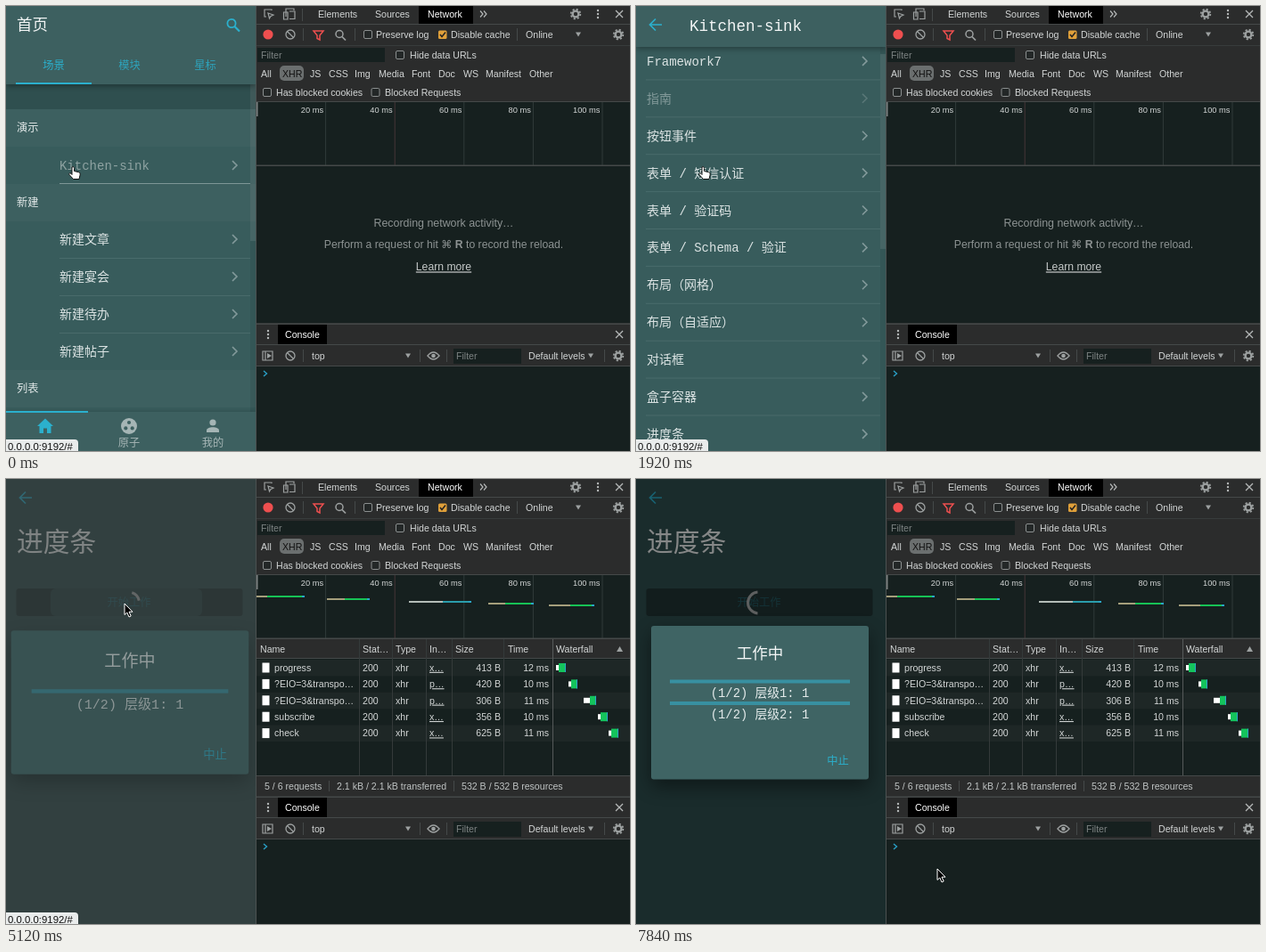
Write an HTML page that moves like this. It is 700 by 500 pixels and loops after 8 s.

```html
<!DOCTYPE html>
<html lang="zh">
<head>
<meta charset="utf-8">
<title>Progress dialog demo</title>
<style>
html, body { margin: 0; width: 100%; height: 100%; overflow: hidden; background: #2f4f4f; }
svg { display: block; width: 100%; height: 100%; }
text { white-space: pre; }
.app text { font-family: "Liberation Mono", "Noto Sans CJK SC", "Noto Sans CJK JP", monospace; }
.dev text, .tip text { font-family: "Liberation Sans", Arial, sans-serif; }
#dialog rect.box { filter: drop-shadow(0 8px 10px rgba(0,0,0,.45)); }
.bar { filter: drop-shadow(0 2px 3px rgba(0,0,0,.35)); }
</style>
</head>
<body>
<svg id="stage" viewBox="0 0 700 500"></svg>
<script>
const CYAN = '#2bb0cd', PAGE = '#2f4f4f', LIST = '#385c5c', BAR = '#3d6060';
const PANEL = '#2b2c2c', DARK = '#16201f', LINE = '#454949', GREY = '#9da1a1';
const LOOP = 8000, STEP = 160;

// y is the vertical middle of the text
const text = (x, y, s, size, fill, anchor = 'start', extra = '') =>
  `<text x="${x}" y="${y + size * .36}" font-size="${size}" fill="${fill}" text-anchor="${anchor}" ${extra}>${s}</text>`;
const rect = (x, y, w, h, fill, extra = '') =>
  `<rect x="${x}" y="${y}" width="${w}" height="${h}" fill="${fill}" ${extra}/>`;
const path = (d, stroke, width = 1.2, extra = '') =>
  `<path d="${d}" fill="none" stroke="${stroke}" stroke-width="${width}" ${extra}/>`;
const disc = (x, y, r, fill) => `<circle cx="${x}" cy="${y}" r="${r}" fill="${fill}"/>`;
const ring = (x, y, r, stroke, w = 1.3, extra = '') =>
  `<circle cx="${x}" cy="${y}" r="${r}" fill="none" stroke="${stroke}" stroke-width="${w}" ${extra}/>`;
const group = (id, body, extra = '') => `<g id="${id}" ${extra}>${body}</g>`;

// ---- phone side ----
const chevron = y => path(`M254 ${y - 5}l5 5l-5 5`, '#82999a', 1.6);
const divider = (x, y) => rect(x, y, 274 - x, 1, '#496b6b');
const back = path('M29 21H16M22 14.5L15.5 21L22 27.5', CYAN, 1.7);
const scrollbar = (id, h) => rect(274, 0, 6, 500, '#000', 'opacity=".07"') +
  rect(274, 0, 6, h, '#fff', `id="${id}" opacity=".09"`);

function home() {
  let s = rect(0, 0, 280, 500, PAGE) + rect(0, 116, 280, 340, LIST);
  [['演示', 137], ['新建', 221], ['列表', 430]].forEach(([name, y]) => {
    s += rect(0, y - 21, 280, 42, BAR) + text(12, y, name, 12.25, '#e3e9e9');
  });
  s += text(60, 179, 'Kitchen-sink', 14, '#8fa3a2') + chevron(179) + rect(60, 199, 214, 1, '#7e9696');
  ['文章', '宴会', '待办', '帖子'].forEach((name, i) => {
    const y = 262 + 42 * i;
    s += text(60, y, '新建' + name, 14, '#dce4e4') + chevron(y);
    if (i < 3) s += divider(60, y + 21);
  });
  s += scrollbar('homeThumb', 264);
  s += `<g class="bar">${rect(0, 0, 280, 88, BAR)}</g>` + text(12, 21, '首页', 17.5, '#f2f5f5');
  s += ring(253, 19.5, 4.6, CYAN, 1.8) + path('M256.5 23L262 28.5', CYAN, 2.2);
  ['场景', '模块', '星标'].forEach((name, i) =>
    s += text(53.5 + 85 * i, 67, name, 12.25, CYAN, 'middle', i ? 'opacity=".85"' : ''));
  s += rect(11, 86, 85, 2, CYAN);
  s += `<g class="bar">${rect(0, 456, 280, 44, BAR)}</g>` + rect(0, 455, 92, 2, CYAN);
  s += `<path d="M44 463.5L53 472H50.5V480H46V474.5H42V480H37.500V472H35Z" fill="${CYAN}"/>`;
  s += disc(138, 472, 9, '#a5b5b5') + disc(138, 468, 2.1, BAR) + disc(134.3, 474.4, 2.1, BAR) + disc(141.7, 474.4, 2.1, BAR);
  s += disc(232, 468, 3.6, '#a5b5b5') + '<path d="M225 479v-2c0-5 14-5 14 0v2z" fill="#a5b5b5"/>';
  return s + text(138, 491, '原子', 12.25, '#a5b5b5', 'middle') + text(232, 491, '我的', 12.25, '#a5b5b5', 'middle');
}

const ITEMS = ['关于', 'Framework7', '指南', '按钮事件', '表单 / 短信认证', '表单 / 验证码',
  '表单 / Schema / 验证', '布局（网格）', '布局（自适应）', '对话框', '盒子容器', '进度条',
  '滑块', '标签页', '图标'];

function kitchen() {
  const rows = ITEMS.map((name, i) => {
    const y = 144 + 41.9 * i;
    return `<g class="row">${text(12, y, name, 14, '#dce4e4')}${chevron(y)}</g>` + divider(11, y + 20.5);
  }).join('');
  return rect(0, 0, 280, 500, PAGE) + group('list', rect(0, 123, 280, 700, LIST) + rows) +
    scrollbar('thumb', 219) + rect(0, 0, 280, 123, PAGE, 'id="head"') +
    group('compact', `<g class="bar">${rect(0, 0, 280, 46, BAR)}</g>` + text(60, 22, 'Kitchen-sink', 17.5, '#f2f5f5')) +
    group('large', text(12, 71, 'Kitchen-sink', 29.75, '#f2f5f5')) + back;
}

function progress() {
  return rect(0, 0, 280, 500, PAGE) + back + text(12, 70, '进度条', 29.75, '#f2f5f5') +
    rect(11.5, 123, 254, 31, '#000', 'id="button" rx="3" opacity="0"') +
    rect(50, 123, 170, 31, '#4f8080', 'id="ripple" rx="6" opacity="0"') +
    text(138, 139, '开始工作', 12.25, CYAN, 'middle', 'id="start"') + path('', '#a8acac', 3, 'id="spin"');
}

const level = n => {
  const y = 62.5 + 24.5 * (n - 1);
  return rect(38, y - 2, 202, 4, '#3890a1') + text(139, y + 12.5, `(1/2) 层级${n}: 1`, 13.8, '#e3eaea', 'middle');
};
const dialog = () => rect(17, 0, 244, 148, '#3f6464', 'class="box" id="box" rx="3"') +
  text(139, 31, '工作中', 17.5, '#f4f7f7', 'middle') + level(1) + group('level2', level(2)) +
  group('stop', text(226.500, 127, '中止', 12.25, CYAN, 'middle'));

// ---- inspector side ----
const gear = (x, y) => ring(x, y, 3.4, GREY, 2.4) + ring(x, y, 5.3, GREY, 1.8, 'stroke-dasharray="2.1 2.06"');
const cross = (x, y) => path(`M${x - 4} ${y - 4}l8 8m0-8l-8 8`, '#b5b8b8', 1.3);
const dots = (x, y) => [-4, 0, 4].map(d => disc(x, y + d, 1.2, '#b5b8b8')).join('');
const block = (x, y) => ring(x, y, 5, GREY) + path(`M${x - 3.500} ${y - 3.5}l7 7`, GREY);
const caret = (x, y) => `<path d="M${x - 3} ${y - 2.500}h6l-3 5z" fill="${GREY}"/>`;
const check = (x, y) => rect(x - 4.5, y - 4.5, 9, 9, '#232727', 'rx="1.5" stroke="#8b8f8f"');
const label = (x, y, s, fill = '#d3d6d6', anchor = 'start') => text(x, y, s, 10.6, fill, anchor);
const vline = (x, y, h, c = LINE) => rect(x, y, 1, h, c);

function toolbar() {
  let s = rect(280, 0, 420, 500, DARK) + rect(281, 0, 419, 107, PANEL) + rect(463, 0, 61, 20, '#000');
  s += path('M298 5V4H290V12H292M294 8L300 10L297 11.500L295.500 14Z', GREY) + vline(332, 3, 14);
  s += path('M314 12V3H323V5M311.500 7H316V15H311.500ZM318 14.500H324V6H318', GREY);
  s += label(350, 9, 'Elements') + label(414, 9, 'Sources') + label(473, 9, 'Network', '#fff');
  s += path('M532 5.500l3 3.500l-3 3.500m4-7l3 3.500l-3 3.500', '#b5b8b8') + gear(639, 9) + dots(664, 9) + cross(688, 9);
  s += rect(281, 20, 419, 1, LINE) + disc(294, 32, 5.6, '#ee4f4f') + block(319, 32);
  s += path('M345 28H356L352 33V38L349 36.500V33Z', '#ee4f4f', 1.5) + ring(374, 31.500, 4, GREY, 1.5) + path('M377 34.500l4 4', GREY, 1.7);
  s += vline(333, 25, 14) + vline(391, 25, 14) + check(406, 32) + label(415, 32, 'Preserve log');
  s += rect(485, 27.5, 9.5, 9.5, '#e0a03a', 'rx="1.5"') + path('M487 32l2 2.500l4-5', '#222', 1.5) + label(499, 32, 'Disable cache');
  s += vline(573, 25, 14) + label(583, 32, 'Online') + caret(642, 32) + gear(687, 32) + rect(281, 44, 419, 1, '#383c3c');
  s += rect(282, 47, 143, 16, DARK) + label(286, 55.5, 'Filter', '#7d8383') + check(442, 55) + label(453, 55, 'Hide data URLs');
  s += rect(307, 67, 27, 17, '#6b6f6f', 'rx="5"');
  [['All', 286], ['XHR', 310], ['JS', 341], ['CSS', 362], ['Img', 391], ['Media', 418], ['Font', 455], ['Doc', 485],
   ['WS', 513], ['Manifest', 538], ['Other', 587]].forEach(([n, x]) => s += label(x, 76, n, n == 'XHR' ? '#111' : '#d3d6d6'));
  s += check(293, 97) + label(303, 97, 'Has blocked cookies') + check(414.5, 97) + label(425, 97, 'Blocked Requests');
  s += rect(281, 107, 419, 1, LINE);
  for (let i = 1; i <= 5; i++) {
    const x = 280.5 + 77.6 * i;
    s += vline(x, 108, 71, i == 2 ? '#463638' : '#303b3a') + text(x - 2, 117, 20 * i + ' ms', 9.3, '#d3d6d6', 'end');
  }
  return s + rect(281, 108, 1.5, 16, '#7d8383') + rect(281, 178.5, 419, 1.5, LINE);
}

const idle = () => text(491, 244, 'Recording network activity…', 12.4, '#8d9393', 'middle') +
  text(491, 268, 'Perform a request or hit <tspan font-family="DejaVu Sans, sans-serif">⌘</tspan> <tspan font-weight="bold">R</tspan> to record the reload.', 12.2, '#8d9393', 'middle') +
  text(491, 293, 'Learn more', 12.2, '#c6caca', 'middle', 'text-decoration="underline"');

function requests() {
  let s = rect(281, 180, 419, 21, PANEL) + rect(281, 201, 419, 1, LINE);
  [['Name', 285], ['Stat…', 400], ['Type', 437], ['In…', 475], ['Size', 504], ['Time', 563], ['Waterfall', 617]]
    .forEach(([n, x]) => s += label(x, 191, n));
  s += `<path d="M685 194h7l-3.500-6z" fill="${GREY}"/>`;
  const rows = [['progress', 'x', 413, 12, 617, 620, 628], ['?EIO=3&amp;transpo…', 'p', 420, 10, 631, 634, 641],
    ['?EIO=3&amp;transpo…', 'p', 306, 11, 648, 655, 662], ['subscribe', 'x', 356, 10, 664, 667, 675], ['check', 'x', 625, 11, 676, 679, 687]];
  rows.forEach(([name, by, size, ms, a, b, c], i) => {
    const y = 212 + 18.4 * i;
    if (i % 2 == 0) s += rect(281, y - 9, 419, 18.4, '#1e2726');
    s += rect(287.5, y - 5.5, 8, 11, '#fff') + label(301, y, name) + label(400, y, 200) + label(437, y, 'xhr') +
      text(475, y, by + '…', 10.6, '#d3d6d6', 'start', 'text-decoration="underline"') + label(555, y, size + ' B', '#d3d6d6', 'end') +
      label(609, y, ms + ' ms', '#d3d6d6', 'end') + rect(a, y - 3, b - a, 6, '#fff') + rect(b, y - 5, c - b, 10, '#14c45c') +
      rect(c - 1, y - 5, 1, 10, '#2aa5c8');
  });
  [396, 433, 471, 500, 558, 613].forEach(x => s += vline(x, 180, 153, x == 613 ? '#565a5a' : '#343a3a'));
  s += rect(281, 333, 419, 24, PANEL) + rect(281, 333, 419, 1, LINE) + label(290, 345, '5 / 6 requests', '#c0c4c4') +
    label(371, 345, '2.1 kB / 2.1 kB transferred', '#c0c4c4') + label(511, 345, '532 B / 532 B resources', '#c0c4c4') +
    vline(362, 339, 12) + vline(502, 339, 12);
  [[281, 293, 335, 132], [360, 380, 408, 135], [452, 490, 522, 138], [541, 560, 592, 140], [609, 633, 660, 142]]
    .forEach(([a, b, c, y], i) => s += rect(a, y - 1, b - a, 2, i == 2 ? '#b4bdb8' : '#a59f7c') +
      rect(b, y - 1, c - b, 2, i == 2 ? '#2a9dac' : '#17c255') + rect(c - 3, y - 1, 3, 2, '#2aa5c8'));
  return s;
}

const consolePane = () => rect(281, 356, 419, 49, PANEL) + rect(281, 356.5, 419, 1.5, LINE) + rect(305, 358, 55, 22, '#000') +
  dots(294, 369) + label(313, 369, 'Console', '#fff') + cross(688, 369) + rect(281, 380, 419, 1, LINE) + rect(281, 404, 419, 1, LINE) +
  path('M288 388H299V398H288ZM291 388V398', GREY) + `<path d="M293 390l5 3l-5 3z" fill="${GREY}"/>` + block(319, 393) +
  vline(333, 386, 14) + label(343, 393, 'top') + caret(451, 393) + vline(464, 386, 14) +
  path('M473 393Q479.500 385 486 393Q479.500 401 473 393Z', GREY, 1.4) + disc(479.500, 393, 2.3, GREY) + vline(494, 386, 14) +
  rect(502, 385, 76, 17, DARK) + label(505, 393.5, 'Filter', '#7d8383') + label(586, 393, 'Default levels') + caret(656, 393) +
  vline(671, 386, 14) + gear(687, 393) + path('M289 410l3.500 3l-3.500 3', '#2a9fc6', 1.4) + vline(280, 0, 500, '#4b5151');

const HAND = 'M0 0c1.500-1 2.500 0 2.500 1.500V4.500l5 1.200c1.500.5 2 1.500 1.500 3.500l-1 4.300H1.500L-3 8.500c-.8-1.500.8-2.300 2-1l1 1z';
const ARROW = 'M0 0V12.500L2.800 10L5 15L7.200 14L5 9.200H9Z';

const stage = document.getElementById('stage');
stage.innerHTML = '<clipPath id="phone"><rect width="280" height="500"/></clipPath><g class="app" clip-path="url(#phone)">' +
  group('home', home()) + group('kitchen', kitchen()) + group('progress', progress()) +
  rect(0, 0, 280, 500, '#000', 'id="shade"') + group('dialog', dialog()) + '</g>' +
  group('tip', rect(-6, 487, 87, 20, '#e9ecec', 'rx="4"') + text(2, 495, '0.0.0.0:9192/#', 11.4, '#111'), 'class="tip"') +
  '<g class="dev">' + toolbar() + group('idle', idle()) + group('requests', requests()) + consolePane() + '</g>' +
  '<path id="cursor" stroke-width="1"/>';

// ---- motion ----
const SCROLL = [[1200, 0], [1440, 42], [1600, 42], [1920, 124], [2240, 124], [2720, 229]];
const CURSOR_X = [[2720, 74], [3200, 77], [4160, 78], [4640, 133], [5760, 133], [6720, 330], [7040, 338]];
const CURSOR_Y = [[2720, 181], [3200, 371], [4160, 370], [4640, 140], [5760, 140], [6720, 425], [7040, 438]];
const clamp = v => Math.max(0, Math.min(1, v));
const ease = p => p * p * (3 - 2 * p);
function track(keys, t) {
  const i = keys.findIndex(k => k[0] > t);
  if (i < 0) return keys[keys.length - 1][1];
  if (i == 0) return keys[0][1];
  const [a, va] = keys[i - 1], [b, vb] = keys[i];
  return va + (vb - va) * ease((t - a) / (b - a));
}
const $ = id => document.getElementById(id);
const set = (id, attrs) => { for (const k in attrs) $(id).setAttribute(k, attrs[k]); };
const show = (id, on) => set(id, { display: on ? 'inline' : 'none' });
const rows = [...document.querySelectorAll('.row')];

function enter(id, t, start) {
  const p = ease(clamp((t - start) / 250));
  set(id, { opacity: p, transform: `translate(0 ${56 * (1 - p)})` });
}

function drawScroll(t) {
  const y = track(SCROLL, t), c = clamp(y / 74);
  set('list', { transform: `translate(0 ${-y})` });
  set('thumb', { y: y * .435 });
  set('head', { height: Math.max(46, 123 - y) });
  set('compact', { opacity: c });
  set('large', { opacity: 1 - c, transform: `translate(0 ${-Math.min(y, 74)})` });
  const hovered = t < 1440 ? 1 : t < 3040 ? 2 : 11;
  rows.forEach((row, i) => row.setAttribute('opacity', i == hovered ? .45 : 1));
}

function drawSpinner(t) {
  const mid = Math.PI + (t - 5760) / 1040 * 2 * Math.PI;
  const half = (30 + 55 * clamp((t - 5120) / 320)) * Math.PI / 180;
  const at = a => `${137.5 + 12 * Math.cos(a)} ${139 + 12 * Math.sin(a)}`;
  set('spin', { d: `M${at(mid - half)}A12 12 0 0 1 ${at(mid + half)}` });
}

function drawDialog(t) {
  const p = clamp((t - 4960) / 320), two = t >= 6240, scale = 1.185 - .185 * p, top = two ? 165 : 177;
  set('dialog', { opacity: p, transform: `translate(139 251) scale(${scale}) translate(-139 ${top - 251})` });
  set('box', { height: two ? 172.5 : 148 });
  set('stop', { transform: `translate(0 ${two ? 24.5 : 0})` });
  show('level2', two);
  set('shade', { fill: t < 5280 ? '#343838' : '#000', opacity: t < 5280 ? 1.2 * p : .45 });
}

function draw(t) {
  enter('kitchen', t, 240);
  enter('progress', t, 3440);
  drawScroll(t);
  const busy = t >= 4800;
  set('button', { opacity: busy ? .33 : 0 });
  set('ripple', { opacity: busy ? .3 * clamp((5600 - t) / 600) : 0 });
  set('start', { opacity: busy ? .3 : 1 });
  show('spin', busy);
  drawSpinner(t);
  drawDialog(t);
  show('idle', t < 4960);
  show('requests', t >= 4960);
  show('tip', t < 3520 || (t >= 4560 && t < 5600));
  const hand = t < 3600 || (t >= 4560 && t < 4960);
  set('cursor', { d: hand ? HAND : ARROW, fill: hand ? '#fff' : '#000', stroke: hand ? '#111' : '#fff',
    transform: `translate(${track(CURSOR_X, t)} ${track(CURSOR_Y, t)})` });
}

const began = performance.now();
function tick() {
  const t = (performance.now() - began) % LOOP;
  draw(Math.floor(t / STEP) * STEP);
  requestAnimationFrame(tick);
}
tick();
</script>
</body>
</html>
```
